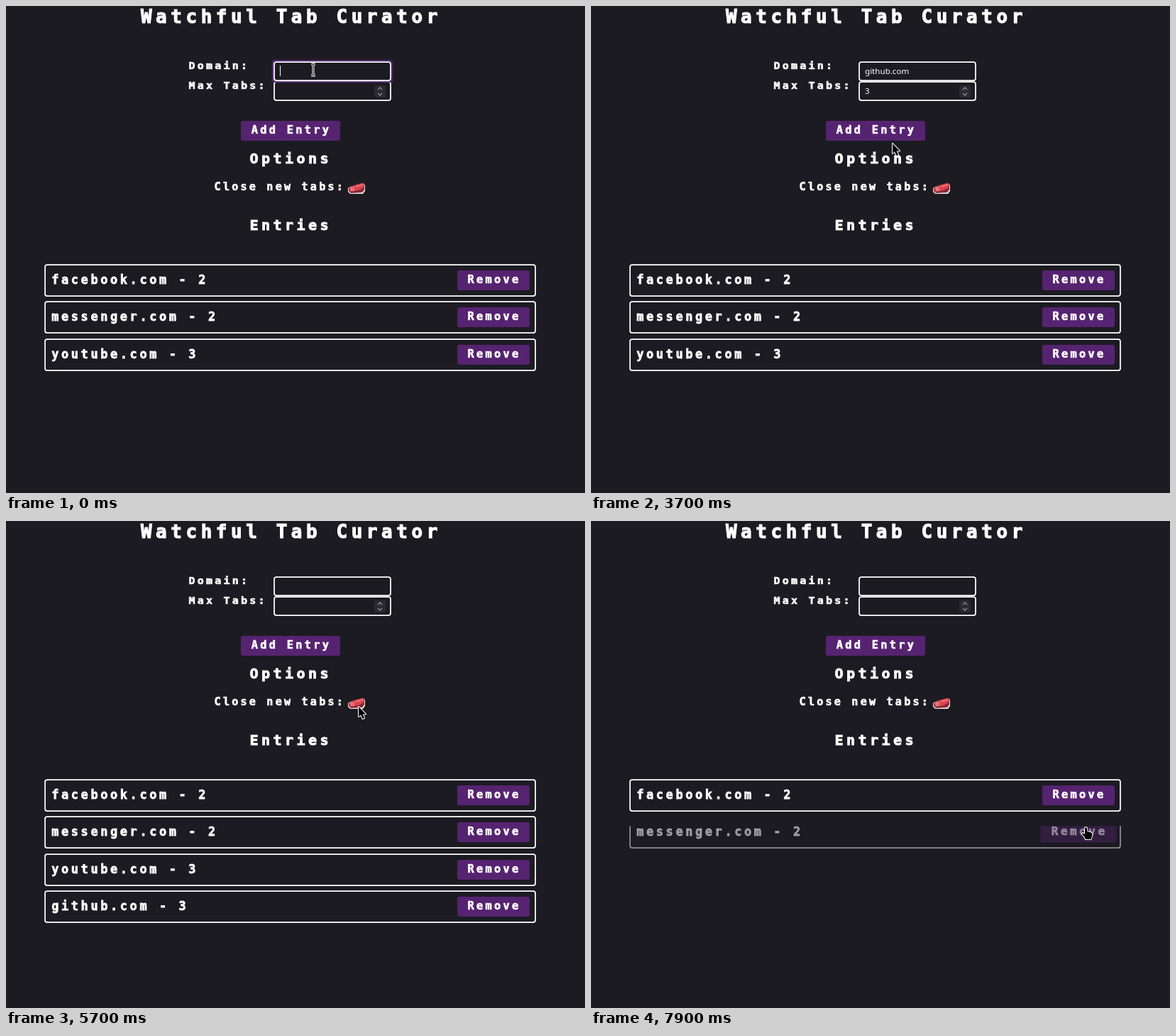
An HTML page with a canvas that plays this animation: 816 by 687 pixels, repeating every 8 s.

```html
<!DOCTYPE html>
<html lang="en">
<head>
<meta charset="utf-8">
<title>Tab list</title>
<style>
  html, body { margin: 0; width: 100%; height: 100%; overflow: hidden; background: #1c1b22; }
  canvas { display: block; }
</style>
</head>
<body>
<canvas id="stage" width="816" height="687"></canvas>
<script>
const ctx = document.getElementById('stage').getContext('2d');
const LOOP = 8000, STEP = 100;
const BG = '#1c1b22', PURPLE = '#562370', WHITE = '#ffffff';
const MID = 400.5, ROW_TOP = 364, ROW_PITCH = 52.4, ROW_H = 46;
const rows = [
  { label: 'facebook.com - 2' },
  { label: 'messenger.com - 2', removed: 7775 },
  { label: 'youtube.com - 3', removed: 7275 },
  { label: 'github.com - 3', added: 3900, removed: 6875 }
];
const domainTyped = [100, 200, 300, 500, 700, 800, 1000, 1100, 1200, 1300];

// time, x, y, pointer shape
const pointerPath = [
  [0, 433, 90, 'beam'], [100, 433, 90, ''],
  [2700, 470, 103, 'beam'], [2900, 447, 143, 'arrow'],
  [3100, 430, 172, 'hand'], [3300, 425, 186, 'hand'],
  [3400, 424, 198, 'arrow'], [3500, 424, 204, 'arrow'],
  [3600, 424, 204, 'arrow'], [3700, 425, 194, 'arrow'],
  [3800, 424, 189, 'hand'], [4200, 424, 189, 'hand'],
  [4300, 440, 205, 'arrow'], [4500, 490, 255, 'hand'],
  [4600, 494, 257, 'hand'], [4700, 497, 262, 'arrow'],
  [6200, 497, 262, 'arrow'], [6300, 514, 287, 'arrow'],
  [6600, 694, 528, 'arrow'], [6700, 698, 540, 'hand'],
  [7200, 698, 540, 'hand'], [7300, 698, 488, 'hand'],
  [7600, 698, 488, 'hand'], [7700, 698, 458, 'arrow'],
  [7800, 698, 432, 'hand'], [8000, 698, 432, 'hand']
];

function pointerAt(t) {
  let i = 0;
  while (i < pointerPath.length - 2 && pointerPath[i + 1][0] <= t) i++;
  const [t0, x0, y0, shape] = pointerPath[i];
  const [t1, x1, y1] = pointerPath[i + 1];
  const k = (t - t0) / (t1 - t0);
  return { x: x0 + (x1 - x0) * k, y: y0 + (y1 - y0) * k, shape };
}

const over = (p, x, y, w, h) =>
  p.shape === 'hand' && p.x >= x && p.x <= x + w && p.y >= y && p.y <= y + h;

function scaled(cx, cy, k, draw) {
  ctx.save();
  ctx.translate(cx, cy);
  ctx.scale(k, k);
  ctx.translate(-cx, -cy);
  draw();
  ctx.restore();
}

// Heavy wide-set monospace; pitch is the distance between letters.
function wideText(text, x, y, pitch) {
  const size = pitch * 1.22, gap = pitch - size * 0.602;
  ctx.font = `bold ${size}px "DejaVu Sans Mono", monospace`;
  ctx.letterSpacing = gap + 'px';
  ctx.fillStyle = ctx.strokeStyle = WHITE;
  ctx.lineWidth = size * 0.045;
  ctx.fillText(text, x + gap / 3, y);
  ctx.strokeText(text, x + gap / 3, y);
  ctx.letterSpacing = '0px';
}

function fillBox(x, y, w, h, r, color) {
  ctx.fillStyle = color;
  ctx.beginPath();
  ctx.roundRect(x, y, w, h, r);
  ctx.fill();
}

function frameBox(x, y, w, h, color = WHITE) {
  ctx.strokeStyle = color;
  ctx.lineWidth = 1.75;
  ctx.beginPath();
  ctx.roundRect(x + 1, y + 1, w - 2, h - 2, 3);
  ctx.stroke();
}

function button(label, x, y, w, h, hovered, glow = hovered) {
  scaled(x + w / 2, y + h / 2, hovered ? 1.05 : 1, () => {
    ctx.save();
    if (glow) {
      ctx.shadowColor = '#6b2b8c';
      ctx.shadowBlur = 7;
    }
    fillBox(x, y, w, h, 3, PURPLE);
    ctx.restore();
    wideText(label, x + w / 2 - label.length * 6.25, y + 18, 12.5);
  });
}

function input(y, text, focused) {
  if (focused) frameBox(375, y - 2, 170, 32, '#5c2a80');
  fillBox(377, y, 166, 28, 3, BG);
  frameBox(377, y, 166, 28);
  ctx.font = '11.6px "Noto Sans", sans-serif';
  ctx.fillStyle = '#fbfbfe';
  ctx.fillText(text, 386, y + 18);
  if (focused) ctx.fillRect(Math.round(386 + ctx.measureText(text).width), y + 6, 1, 15);
}

function polyline(points, close) {
  ctx.beginPath();
  points.forEach(([x, y]) => ctx.lineTo(x, y));
  if (close) ctx.closePath();
}

function fillPoly(points, color) {
  polyline(points, true);
  ctx.fillStyle = color;
  ctx.fill();
}

function spinner() {
  fillBox(519, 112, 16, 17, 2, '#2b2a33');
  ctx.strokeStyle = '#8f8f9d';
  ctx.lineWidth = 1.3;
  for (const [y, d] of [[118, -3], [123, 3]]) {
    polyline([[524, y], [527, y + d], [530, y]]);
    ctx.stroke();
  }
}

function meat(hovered, toggled) {
  const [dark, flesh, light] = toggled
    ? ['#55291c', '#935032', '#c98b5c']
    : ['#8d2634', '#d8444f', '#f39a98'];
  scaled(494, 257, hovered ? 1.15 : 1, () => {
    fillPoly([[482, 257], [485, 255], [505, 251], [506, 253], [506, 261], [503, 265], [485, 265], [482, 262]], '#e9e3e3');
    fillPoly([[483, 257], [505, 252], [505, 259], [502, 263], [486, 264], [483, 261]], dark);
    fillPoly([[484, 256], [490, 253], [503, 249.5], [505, 251], [504, 256], [497, 260], [485, 262]], flesh);
    ctx.strokeStyle = light;
    ctx.lineWidth = 1.2;
    ctx.strokeRect(486.5, 256.5, 3.5, 3.5);
    polyline([[493, 255], [503, 252]]);
    ctx.stroke();
  });
}

function entry(row, i, t, p) {
  const { label, added = -1, removed = Infinity } = row;
  const gone = Math.max(0, (t - removed) / 250);
  if (t <= added || gone >= 1) return;
  const exactY = ROW_TOP + i * ROW_PITCH, y = Math.round(exactY);
  const age = added < 0 ? 600 : Math.min(600, t - added);
  const size = age < 300 ? age / 300 * 1.19 : 1.19 - 0.19 * (age - 300) / 300;
  const tint = 1 - Math.abs(age - 300) / 300;

  ctx.save();
  if (gone) {
    const cut = ROW_H * Math.pow(gone, 1.7);
    ctx.globalAlpha = 1 - gone;
    ctx.beginPath();
    ctx.rect(0, y + cut, 816, ROW_H - cut);
    ctx.clip();
  }
  scaled(MID, exactY + ROW_H / 2, size, () => {
    fillBox(54, y, 693, ROW_H, 4, BG);
    if (tint > 0) {
      ctx.save();
      ctx.globalAlpha *= tint;
      fillBox(54, y, 693, ROW_H, 4, PURPLE);
      ctx.restore();
    }
    frameBox(54, y, 693, ROW_H);
    wideText(label, 63, y + 28, 13.8);
    const hovered = over(p, 636, y + 9, 102, 28);
    if (gone) ctx.globalAlpha *= 0.8;
    button('Remove', 636, y + 9, 102, 28, hovered, hovered && !gone);
  });
  ctx.restore();
}

const shapes = {
  beam() {
    const path = [[-3, -8], [-1, -8], [0, -7], [1, -8], [3, -8]];
    for (const [color, width] of [[WHITE, 3], ['#000', 1]]) {
      ctx.strokeStyle = color;
      ctx.lineWidth = width;
      polyline(path);
      ctx.stroke();
      polyline(path.map(([x, y]) => [x, -y]));
      ctx.stroke();
      polyline([[0, -7], [0, 7]]);
      ctx.stroke();
    }
  },
  arrow() {
    outlined([[0, 0], [0, 14], [3, 11.5], [5.5, 17], [8, 16], [5.7, 10.5], [10, 10.5]]);
  },
  hand() {
    outlined([[-2, 1], [-1, 0], [1, 1], [1.5, 6], [6, 7], [8.5, 9], [8, 13], [6.5, 17], [-1, 17], [-3, 13], [-6, 10], [-5, 8], [-2, 10]]);
  }
};

function outlined(points) {
  polyline(points, true);
  ctx.lineJoin = 'round';
  ctx.strokeStyle = WHITE;
  ctx.lineWidth = 2;
  ctx.stroke();
  ctx.fillStyle = '#000';
  ctx.fill();
}

function drawPointer(p) {
  if (!p.shape) return;
  ctx.save();
  ctx.translate(p.x, p.y);
  shapes[p.shape]();
  ctx.restore();
}

function render(t) {
  const p = pointerAt(t);
  const sent = t >= 3900;
  const typed = domainTyped.filter(at => at <= t).length;

  ctx.fillStyle = BG;
  ctx.fillRect(0, 0, 816, 687);

  wideText('Watchful Tab Curator', 188, 24, 21.2);
  wideText('Domain:', 256.5, 89, 12.25);
  wideText('Max Tabs:', 256.5, 117, 12.25);
  wideText('Options', 342, 222, 16.5);
  wideText('Close new tabs:', 292.5, 260, 12.3);
  wideText('Entries', 342, 316, 16.5);

  const domain = () => input(78, sent ? '' : 'github.com'.slice(0, typed), t < 1400);
  const limit = () => input(106, !sent && t >= 2200 ? '3' : '', t >= 1400 && t < 3300);
  if (t < 1400) { limit(); domain(); } else { domain(); limit(); }
  spinner();

  button('Add Entry', 331, 162, 140, 28, over(p, 331, 161, 140, 30));
  meat(over(p, 482, 249, 24, 16), t >= 5200 && t < 5700);
  rows.forEach((row, i) => entry(row, i, t, p));
  drawPointer(p);
}

function tick(now) {
  render(Math.floor((now % LOOP) / STEP) * STEP);
  requestAnimationFrame(tick);
}
render(0);
requestAnimationFrame(tick);
</script>
</body>
</html>
```
